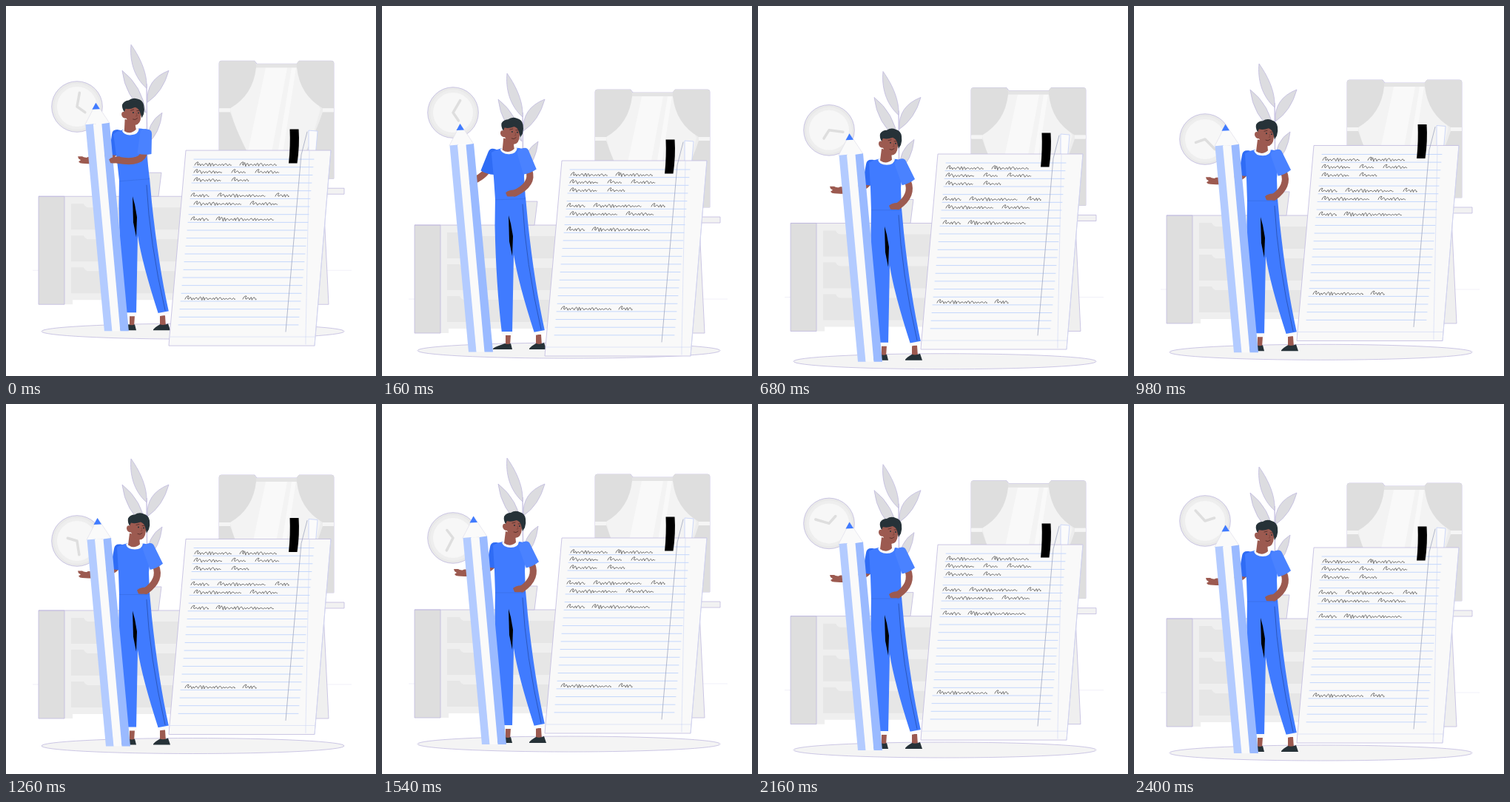
Recreate the animation shown at these times as an HTML page. Size 500 by 500 pixels, loop 2420 ms.

```html
<!DOCTYPE html>
<html lang="en">
<head>
<meta charset="utf-8">
<title>Man with pencil and notepad</title>
<style>
  html, body { margin: 0; width: 100%; height: 100%; overflow: hidden; background: #fff; }
  svg { display: block; width: 100%; height: 100%; }
  .edge { stroke: #bfb9df; stroke-width: .8; }
  .line { fill: none; stroke-linecap: round; stroke-linejoin: round; }
  .skin { fill: #9c5a50; }
  .limb { stroke: #9c5a50; stroke-width: 9; }
  .blue { fill: #407bff; }
  .dark { fill: #263238; }
</style>
</head>
<body>
<svg viewBox="0 0 500 500">
  <defs>
    <path id="sleeve" d="M-8 0Q-8-7 0-7T8-1L10 26Q0 29-9 27Z"/>
  </defs>

  <g id="room">
    <path d="M36 378H467" stroke="#c6c1e2" stroke-width=".25"/>

    <!-- window -->
    <path class="edge" fill="#ededed" d="M288 98q0-3 3-3H336L339 99H393L396 95H440q3 0 3 3V254H288Z"/>
    <path fill="#f3f3f3" d="M336 104H396L425 160 402 240H326L303 160Z"/>
    <path fill="#f9f9f9" d="M351 104H380L355 240H322ZM386 104H392L371 240H364Z"/>
    <path fill="#e4e4e4" d="M338 99H394V104H338Z"/>
    <g fill="#dedede">
      <path id="drape" d="M288 98q0-3 3-3H335q4 2 3 9Q334 141 303 159H288ZM288 164H303Q311 189 328 222V254H288Z"/>
      <use href="#drape" transform="matrix(-1 0 0 1 731 0)"/>
    </g>
    <path fill="#f5f5f5" d="M288 159H303V164H288ZM428 159H443V164H428Z"/>
    <path class="edge" fill="#f2f2f2" d="M400 267H457V275H400Z"/>
    <path class="edge" fill="#efefef" d="M400 260H428L436 424H400Z"/>

    <!-- cabinet -->
    <path fill="#efefef" d="M79 278H260V418H90V424H79Z"/>
    <path class="edge" fill="#dedede" d="M79 278H44V424H79Z"/>
    <path d="M44 278H260" class="edge"/>
    <g fill="#e6e6e6">
      <path id="drawer" d="M88 288H105q2 5 7 5H250V323H88Z"/>
      <use href="#drawer" y="43"/>
      <use href="#drawer" y="86"/>
    </g>

    <!-- plant -->
    <g class="edge" fill="#dcdce0" transform="translate(0 1)">
      <path d="M190 125L191 246" stroke-width="1.2"/>
      <path d="M169 72C167 92 172 115 190 131C191 112 183 92 169 72Z"/>
      <path d="M220 107Q189 119 191 150Q212 136 220 107Z"/>
      <path d="M157 107Q161 142 189 164Q184 128 157 107Z"/>
      <path d="M211 164Q190 177 191 206Q208 192 211 164Z"/>
      <path fill="#ebebeb" d="M172 245H210L206 277H176Z"/>
    </g>
  </g>

  <g id="clock">
    <circle class="edge" cx="96" cy="181" r="34.3" fill="#e9e9e9"/>
    <circle cx="96" cy="181" r="31" fill="#eeeeee"/>
    <circle cx="96" cy="181" r="27" fill="#f7f7f7"/>
    <path id="hands" class="line" d="M96 162V181l12 5.6" stroke="#dedede" stroke-width="3.5" stroke-linecap="butt"/>
  </g>

  <g id="man">
    <ellipse class="edge" cx="252.5" cy="459.500" rx="204.5" ry="10.5" fill="#f4f4f4"/>

    <!-- legs -->
    <path class="skin" d="M167 438H174L173 453H167ZM208 438H215L216 453H208Z"/>
    <path class="dark" d="M150 457Q152 455 158 453L166 450Q170 452 174 450L176 458H150ZM199 457Q201 454 208 450Q213 452 219 449L222 458H199Z"/>
    <path class="blue" d="M153 252H194L197 285Q206 370 220 433L206 436Q184 368 178 330L176 436H162Q154 370 152.500 290Z"/>
    <path fill="#000" d="M171 277L174 288 177 305 176 332 172 312Z"/>
    <path class="line" d="M190 262Q194 340 215 431" stroke="#2c58bd"/>
    <path fill="#fafafa" d="M161 434H177L176 439H163ZM204 435L220 432 221 436 207 439Z"/>

    <!-- arm behind the pencil -->
    <path id="backArm" class="line limb"/>
    <path id="backHand" class="skin" d="M10 -3Q0 -3-3-5L-9-5-8-2-5 0-8 2-6 4Q0 5 10 5Z"/>
    <use id="backSleeve" href="#sleeve" fill="#2f6cf5"/>

    <!-- torso and head -->
    <g id="torso">
      <path class="blue" d="M150 191Q156 187 163 186L184 186Q191 186 196 190L193 225 194 256H153L152 225Z"/>
      <path d="M153 255H194" stroke="#3870e8" stroke-width=".8"/>
      <path fill="#fafafa" d="M162 187Q164 194 174 194T185 186L181 185H166Z"/>
      <path class="skin" d="M167 172L165 188Q173 194 181 187L180 176Z"/>
      <path class="skin" d="M167 155H188Q190 162 189 169 188 181 180 181 172 180 169 171 164 171 163 166 163 161 167 162Z"/>
      <path class="dark" d="M167 162Q164 157 165 152 168 147 174 147 180 143 186 146 193 148 194 155 195 161 193 167L190 172 188 164Q187 159 182 157 174 160 169 158Z"/>
      <g class="dark">
        <circle cx="179" cy="164" r="1"/>
        <circle cx="186" cy="165" r="1"/>
      </g>
      <path class="line" d="M176 161l4-1M184 162l3 0M178 173Q181 175 184 172" stroke="#4b2925" stroke-width=".8"/>
      <path class="line" d="M183 165l1 4-2 0" stroke="#7c4139" stroke-width=".7"/>
    </g>

    <g id="pencil">
      <path fill="#fafafa" d="M109 181L124 152 142 179Z"/>
      <path class="line" d="M109 181L124 152 142 179" stroke="#dcdae8" stroke-width=".6"/>
      <path class="blue" d="M118.500 160.500L123.500 151.500 129 160Z"/>
      <path fill="#b3cbff" d="M109.500 181L121 180 146 460H135Z"/>
      <path fill="#fafafa" d="M120 180.500L132 180 157 460H145.500Z"/>
      <path fill="#9abaff" d="M131.500 180L142 178.500 168 460H156.500Z"/>
    </g>

    <!-- arm in front -->
    <path id="frontArm" class="line limb"/>
    <path id="frontHand" class="skin" d="M9-5Q0-5-3-3L-6-1-4 4Q4 5 10 3Z"/>
    <use id="frontSleeve" href="#sleeve" fill="#4a82ff"/>
  </g>

  <g id="paper">
    <path class="line" d="M409 181V154L421 155 418 190" style="fill:#fbfbfb" stroke="#c3d0f8" stroke-width=".8"/>
    <path class="edge" fill="#f9f9f9" d="M243 181H439L417 445H220L221 432Z"/>
    <path class="line" d="M439 181L417 445M221 433H417M405 433V443M410 181L405 433" stroke="#d5dcf5" stroke-width=".7"/>
    <path id="rules" class="line" stroke="#c4d7fc"/>
    <path class="line" d="M407 156L399 187 378 426" stroke="#a0a8c0" stroke-width=".8"/>
    <path id="writing" class="line" stroke="#505050" stroke-width=".8"/>
    <path d="M383.500 152.500H395.500Q397 175 393.500 198.500H382Q384.500 175 383.500 152.500Z"/>
  </g>
</svg>
<script>
  const LOOP = 2420;
  const $ = id => document.getElementById(id);
  const set = (id, name, value) => $(id).setAttribute(name, value);

  // Ruled lines follow the slant of the sheet.
  let rules = '';
  for (let i = 0; i < 22; i++) rules += `M${254 - i} ${193 + i * 10.66}h162`;
  set('rules', 'd', rules);

  // Handwriting: baseline, then start and end of each word.
  const rows = [
    [199, 255, 306, 316, 367], [209, 254, 292, 305, 326, 337, 369], [220, 254, 292, 305, 328],
    [241, 250, 277, 286, 353, 364, 384], [252, 254, 320, 330, 369], [273, 250, 276, 284, 361],
    [380, 242, 309, 320, 340]
  ];
  // A hooked first letter, uneven humps, and a tail that flattens out.
  const scribble = (start, end, y) => {
    let d = `M${start} ${y + 2}q2 -5 5 -4q-3 4 0 4`, x = start + 5;
    for (let i = 0; x < end - 3; i++) {
      const width = 4.5 + 1.5 * Math.sin(i * 2 + y);
      const height = (5 + 2 * Math.sin(i * 1.3 + start)) * (1 - .6 * (x - start) / (end - start));
      d += `q${width * .5} ${-height} ${width * .7} ${-height * .2}t${width * .3} ${height * .2}`;
      x += width;
    }
    return d;
  };
  let writing = '';
  for (const [y, ...ends] of rows)
    for (let i = 0; i < ends.length; i += 2) writing += scribble(ends[i], ends[i + 1], y);
  set('writing', 'd', writing);

  // Tracks share these times; a short track holds its last value.
  const times = [0, 160, 440, 540, 980, 1260, 1540, 1900, 2400];
  const heights = {
    room: [-21, 18, 23, 20.5, 5, 1, 0, 5, 12],
    clock: [-45, -37, -25, -20, -1, 4, 0, -15, -23],
    man: [-20, 6, 34, 28, 8.3, 2.5, 0, 4, 12],
    paper: [14, 28, 29, 25, 7.5, 1.5, 0, 5, 13]
  };

  // Monotone cubic interpolation.
  function sample(track, t) {
    const value = i => track[Math.min(i, track.length - 1)];
    const slope = i => (value(i + 1) - value(i)) / (times[i + 1] - times[i]);
    const tangent = i => {
      if (i === 0) return slope(0);
      if (i === times.length - 1) return slope(i - 1);
      const a = slope(i - 1), b = slope(i);
      return a * b > 0 ? 2 * a * b / (a + b) : 0;
    };
    let i = 0;
    while (i < times.length - 2 && t > times[i + 1]) i++;
    const h = times[i + 1] - times[i];
    const u = Math.min(1, (t - times[i]) / h), v = 1 - u;
    return value(i) * (1 + 2 * u) * v * v + value(i + 1) * u * u * (3 - 2 * u)
      + h * u * v * (tangent(i) * v - tangent(i + 1) * u);
  }

  // The elbow is the control point of the bent forearm.
  function drawArm(name, [sx, sy], [ex, ey], [hx, hy]) {
    const dx = ex - sx, dy = ey - sy;
    const angle = -Math.atan2(dx, dy) * 180 / Math.PI;
    set(name + 'Sleeve', 'transform', `translate(${sx} ${sy}) rotate(${angle})`);
    set(name + 'Arm', 'd', `M${sx + dx * .55} ${sy + dy * .55}Q${ex} ${ey} ${hx + 6} ${hy}`);
    set(name + 'Hand', 'transform', `translate(${hx} ${hy})`);
  }

  function draw(t) {
    const at = (...track) => sample(track, t);
    for (const id in heights) set(id, 'transform', `translate(0 ${sample(heights[id], t)})`);
    set('hands', 'transform', `rotate(${10 + t * .128} 96 181)`);
    set('pencil', 'transform', `translate(${at(-2, -18, 0)} ${at(-1, 1.5, 0)})`);
    set('torso', 'transform', `rotate(${at(-4.5, -2, 0)} 174 254)`);
    drawArm('back', [at(151, 151, 154), 194], [at(148, 141, 149), at(226, 222, 228)],
      [at(106, 118, 106), at(228, 230, 228)]);
    drawArm('front', [at(189, 191, 193), 193], [at(185, 205, 210), at(234, 235, 235)],
      [at(145, 173, 183), at(228, 247, 250)]);
  }

  const start = performance.now();
  (function tick() {
    draw((performance.now() - start) % LOOP);
    requestAnimationFrame(tick);
  })();
</script>
</body>
</html>
```
